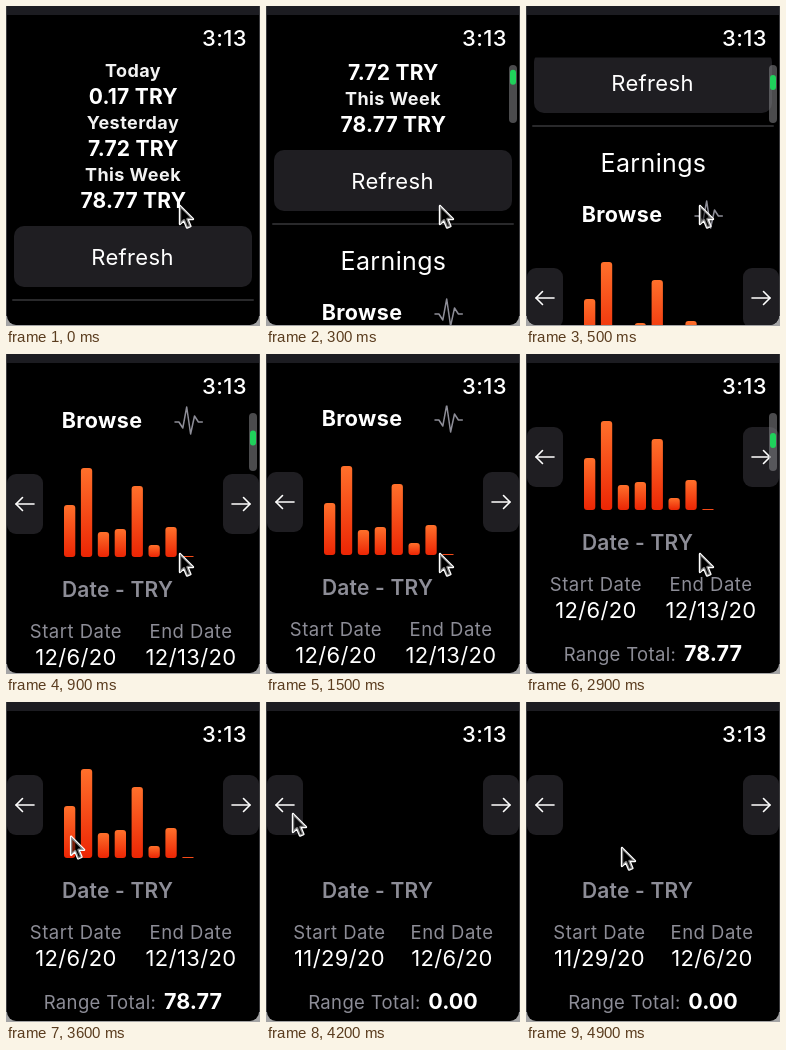
These frames come from a looping animation (254x320 px, 5 s). An HTML page with a canvas:

```html
<!DOCTYPE html>
<html lang="en">
<head>
<meta charset="utf-8">
<title>Watch earnings</title>
<style>
html, body { margin: 0; width: 100%; height: 100%; overflow: hidden; background: #000; }
canvas { display: block; width: 254px; height: 320px; }
</style>
</head>
<body>
<canvas></canvas>
<script>
const W = 254, H = 320, LOOP = 5000, STEP = 100;
const canvas = document.querySelector('canvas');
const ctx = canvas.getContext('2d');
const ratio = window.devicePixelRatio || 1;
canvas.width = W * ratio;
canvas.height = H * ratio;

const GREY = '#8d8d97', PANEL = '#1f1e22';
const BARS = [52, 89, 25, 28, 71, 12, 30, 1];

const ramp = (t, from, to) => Math.min(1, Math.max(0, (t - from) / (to - from)));
const ease = (t, from, to) => {
  const p = ramp(t, from, to);
  return p * p * (3 - 2 * p);
};

// Two swipes, each of which shows the scroll bar for a while
const scrollAt = t => Math.round(318 * ease(t, 0, 940) + 45 * ease(t, 1950, 2850));
const barAlpha = t => ramp(t, 0, 200) - ramp(t, 1200, 1500) + ramp(t, 2000, 2200) - ramp(t, 3200, 3500);
const pressScale = t => 1 - 0.1 * Math.sin(Math.PI * ramp(t, 3800, 4200));

function mouseAt(t) {
  const toButton = ease(t, 3200, 3800), away = ease(t, 4600, 4900);
  return [173 - 147 * toButton + 69 * away, 199 - 88 * toButton + 34 * away];
}

function box(x, y, w, h, r, fill) {
  ctx.beginPath();
  ctx.roundRect(x, y, w, h, r);
  ctx.fillStyle = fill;
  ctx.fill();
}

function text(str, x, y, size, weight = 400, color = '#fff', spacing = 0.35) {
  ctx.font = `${weight} ${size}px Inter, "Liberation Sans", sans-serif`;
  ctx.letterSpacing = spacing + 'px';
  ctx.textAlign = 'center';
  ctx.fillStyle = color;
  ctx.fillText(str, x, y);
}

function line(points, color, width) {
  ctx.beginPath();
  points.forEach(([x, y]) => ctx.lineTo(x, y));
  ctx.strokeStyle = color;
  ctx.lineWidth = width;
  ctx.lineJoin = ctx.lineCap = 'round';
  ctx.stroke();
}

function arrowButton(x, dir, scale) {
  ctx.save();
  ctx.translate(x, 466);
  ctx.scale(dir * scale, scale);
  box(-18, -30, 36, 60, 9, PANEL);
  line([[-9, 0], [9, 0]], '#fff', 1.6);
  line([[2.5, -6.5], [9, 0], [2.5, 6.5]], '#fff', 1.6);
  ctx.restore();
}

function pulseIcon() {
  const beat = [0, 0, 6, -15, 12, -6, 0, 0];
  line(beat.map((dy, i) => [169 + i * 3.9, 384 + dy]), GREY, 1.5);
}

function chart() {
  BARS.forEach((h, i) => {
    const y = 519 - h;
    const fill = ctx.createLinearGradient(0, y, 0, 519);
    fill.addColorStop(0, '#ff702b');
    fill.addColorStop(1, '#ec2504');
    box(58 + i * 16.9, y, 11.3, h, Math.min(3, h / 2), fill);
  });
}

function summary() {
  [['Today', '0.17'], ['Yesterday', '7.72'], ['This Week', '78.77']].forEach(([label, sum], i) => {
    text(label, 127, 70.5 + i * 52, 18, 650, '#f2f2f2', 0.45);
    text(sum + ' TRY', 127.3, 98 + i * 52, 21, 650, '#fff', 0.2);
  });
  box(8, 220, 238, 61, 10, PANEL);
  text('Refresh', 126.5, 259, 22);
  box(6, 293, 242, 2, 1, '#29292b');
}

function dateRange(center, label, date) {
  text(label, center, 600, 18.5, 400, GREY, 0.5);
  text(date, center, 626.5, 22);
}

function earnings(t) {
  const previous = t >= 4100;
  text('Earnings', 127.5, 340, 25);
  text('Browse', 96, 390, 21.5, 650);
  pulseIcon();
  if (!previous) chart();
  arrowButton(19, -1, pressScale(t));
  arrowButton(235, 1, 1);
  text('Date - TRY', 111.5, 559, 21, 600, GREY, 0.2);

  const [from, to, total, totalX] = previous
    ? ['11/29/20', '12/6/20', '0.00', 98.5]
    : ['12/6/20', '12/13/20', '78.77', 94];
  dateRange(previous ? 73.5 : 70, 'Start Date', from);
  dateRange(previous ? 186 : 185, 'End Date', to);
  text('Range Total:', totalX, 670, 18.5, 400, GREY);
  text(total, 187, 670, 21.5, 650, '#fff', 0);
}

function cursor(x, y) {
  ctx.save();
  ctx.translate(x, y);
  line([[1, 1], [1, 19], [5, 15.2], [8, 22.6], [11.4, 21.2], [8.4, 14], [14, 14], [1, 1]], '#fff', 2.4);
  ctx.fillStyle = '#000';
  ctx.globalAlpha = 0.5;
  ctx.fill();
  ctx.restore();
}

function draw(now) {
  const t = Math.floor(now % LOOP / STEP) * STEP;
  const scroll = scrollAt(t);
  ctx.setTransform(ratio, 0, 0, ratio, 0, 0);
  box(0, 0, W, H, 0, '#3a3a3d');
  box(0, 310, W, 10, 0, '#a4a4a5');
  box(1, 0, W - 2, 9, 0, '#1c1c21');

  ctx.save();
  ctx.beginPath();
  ctx.roundRect(1, 9, 252, 310, [0, 0, 9, 9]);
  ctx.clip();
  box(0, 9, W, H, 0, '#000');
  text('3:13', 218.5, 39.5, 22, 500);

  ctx.save();
  ctx.beginPath();
  ctx.rect(0, 51.5, W, H);
  ctx.clip();
  ctx.translate(0, -scroll);
  summary();
  earnings(t);
  ctx.restore();

  ctx.globalAlpha = barAlpha(t);
  box(243, 59, 8, 58, 4, 'rgba(125,125,128,.6)');
  box(244, 59.7 + scroll * 0.053, 6, 15, 3, '#1fd15b');
  ctx.restore();

  cursor(...mouseAt(t));
}

const start = performance.now();
function loop() {
  draw(performance.now() - start);
  requestAnimationFrame(loop);
}
loop();
</script>
</body>
</html>
```
